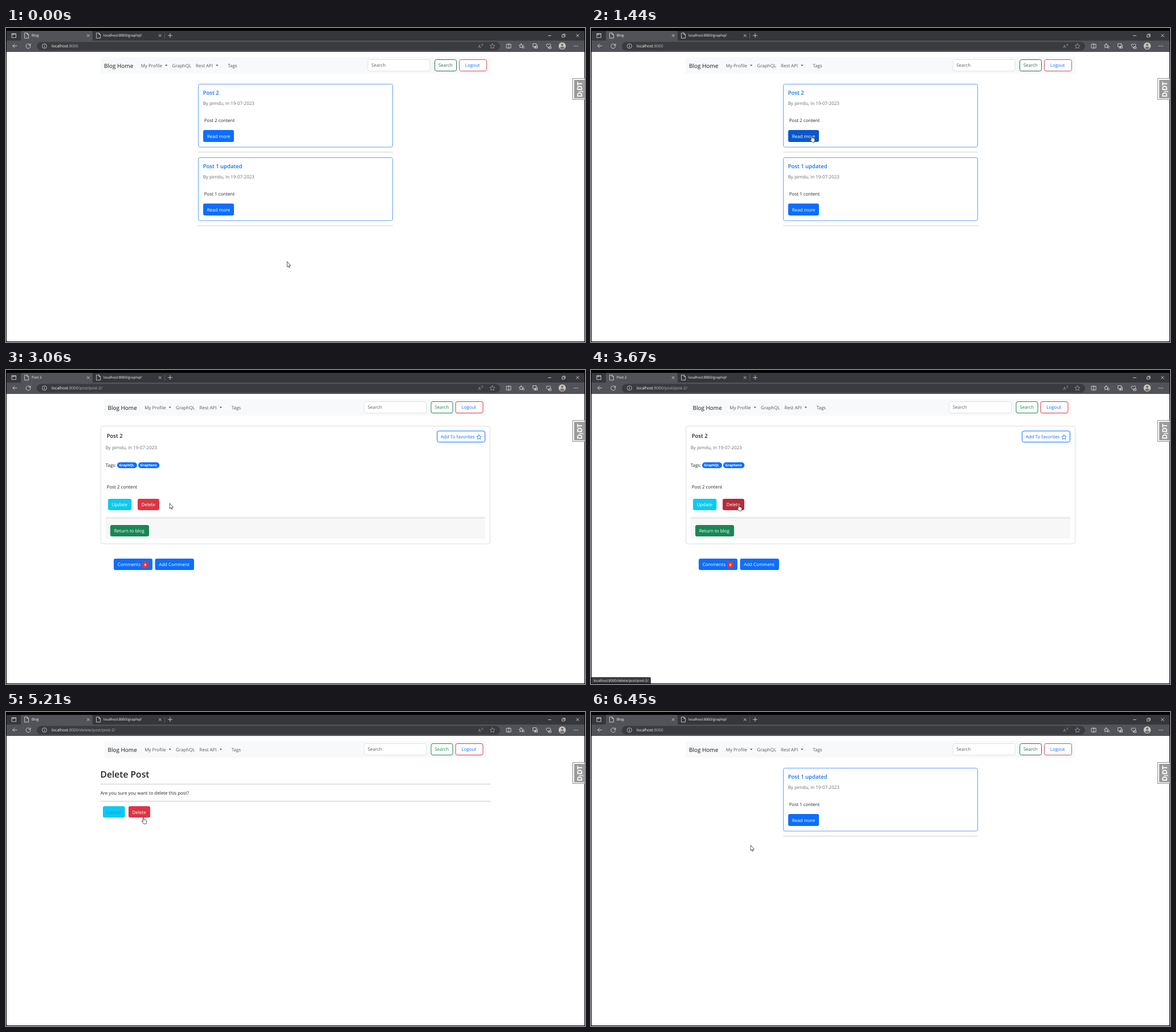
An HTML page for the animation above (7510 ms loop, 1016 by 551 pixels).

```html
<!DOCTYPE html>
<html lang="en">
<head>
<meta charset="utf-8">
<title>Blog</title>
<style>
html, body { margin: 0; width: 100%; height: 100%; overflow: hidden; background: #000; }
svg { display: block; width: 100%; height: 100%; font-family: "Open Sans", "Noto Sans", sans-serif; text-rendering: geometricPrecision; }
</style>
</head>
<body>
<svg id="stage" viewBox="0 0 1016 551"></svg>
<script>
const LOOP = 7510;
const BLUE = '#0d6efd', CYAN = '#0dcaf0', RED = '#dc3545', GREEN = '#198754', INK = '#212529', MUTED = '#686c70';
const AUTHOR = 'By pimdu, In 19-07-2023';
const stage = document.getElementById('stage');

const text = (x, y, s, fill = INK, size = 7.97, weight = 400) =>
  `<text x="${x}" y="${y}" fill="${fill}" font-size="${size}" font-weight="${weight}">${s}</text>`;
const rect = (x, y, w, h, fill, r = 0, stroke = 'none') =>
  `<rect x="${x}" y="${y}" width="${w}" height="${h}" rx="${r}" fill="${fill}" stroke="${stroke}"/>`;
const line = (d, stroke = '#e6e6e8', w = .8, fill = 'none') =>
  `<path d="${d}" fill="${fill}" stroke="${stroke}" stroke-width="${w}" stroke-linecap="round" stroke-linejoin="round"/>`;
const disc = (x, y, r, fill, stroke = 'none') =>
  `<circle cx="${x}" cy="${y}" r="${r}" fill="${fill}" stroke="${stroke}" stroke-width=".8"/>`;
const button = (x, y, w, h, label, fill, ink = '#fff') =>
  rect(x, y, w, h, fill, 3) + text(x + 6.7, y + h / 2 + 3.2, label, ink);
const outline = (x, y, w, h, label, edge, ink = edge, pad = 6.7) =>
  rect(x + .5, y + .5, w - 1, h - 1, '#fff', 3, edge) + text(x + pad, y + h / 2 + 2.8, label, ink);
const rule = (x, y, w, color = '#d0d1d2') => rect(x, y, w, 1, color);
const cross = (x, y, r) => line(`M${x - r} ${y - r}l${2 * r} ${2 * r}m0 ${-2 * r}l${-2 * r} ${2 * r}`);
const star = (x, y, r, color) => {
  let d = '';
  for (let i = 0; i < 10; i++) {
    const a = i * Math.PI / 5, q = i % 2 ? r * .5 : r;
    d += (i ? 'L' : 'M') + (x + q * Math.sin(a)).toFixed(2) + ' ' + (y - q * Math.cos(a)).toFixed(2);
  }
  return line(d + 'Z', color, .8);
};
const fileIcon = x => line(`M${x} 8.8h4l2.6 2.6v6.4h-6.6zM${x + 4} 8.8v2.6h2.6`);

function toolbarIcons() {
  return line('M19 31.5H12M15 28.3L11.8 31.5 15 34.7') +
    disc(67.5, 31.7, 4, 'none', '#d8d8da') + line('M67.5 31.3v2.4M67.5 29.6v.1') +
    text(828.5, 34.5, 'A', '#a9a9ad', 7.5) + line('M834.5 28.4q1.2 1 0 2.2M836 27.5q2 1.8 0 4', '#a9a9ad', .6) +
    star(853.5, 32, 4.6, '#a9a9ad') +
    line('M878.5 28.5h7.5v6.5h-7.5zM882.2 27.5v8.5') +
    star(904, 31.5, 4, '#e6e6e8') + line('M906.5 32.5h3M906.5 34.8h3') +
    line('M925 27.5h5.5v5.5H925zM927 35.3h5.5v-5.5M928.7 31.5v4M926.8 33.5h4') +
    line('M952 35l-3.6-3.5q-1.3-2.6 1.2-3.5 1.5 0 2.4 1.4.9-1.4 2.4-1.4 2.5.9 1.2 3.5zM952.5 33h4v3h-4z') +
    disc(976, 31.5, 6.3, '#c9c6c4') + disc(976, 29.5, 2.1, '#77706e') +
    line('M972 35.3q.5-2.9 4-2.9t4 2.9q-1.5 1.6-4 1.6t-4-1.6z', 'none', 0, '#77706e') +
    [997, 1000, 1003].map(x => disc(x, 31.7, .75, '#f0f0f0')).join('');
}

function browser(title, path, loading, t) {
  const spin = -(t - 4410) * .36;
  return rect(1, 5, 1014, 18, '#36373b') +
    line('M24 22.5q2 0 2-2V8q0-3 3-3h120q3 0 3 3v12.5q0 2 2 2z', 'none', 0, '#525358') +
    rect(1, 22, 1014, 20, '#525358') +
    rect(54, 24.5, 813, 15, '#3a3b3f', 7.5) +
    line('M10.5 9.8h7v7h-7zM10.5 11h7M12.6 11v1.4') +
    (loading
      ? `<g transform="rotate(${spin.toFixed(1)} 36.3 13.2)">${line('M34 10.4q-2.1 2.6-.2 5.6', '#fff', 1)}</g>`
      : fileIcon(33)) +
    text(45, 15.4, title, '#fff', 6.1) + cross(144.3, 13.4, 2) +
    fileIcon(159) + text(171, 15.4, 'localhost:8000/graphql/', '#fff', 6.1) + cross(270.3, 13.4, 2) +
    line('M278.5 8.5v10', '#6b6c70', .7) + line('M284.5 13.2h7M288 9.7v7') +
    line('M951.5 13.5h5') + line('M976 12h4v4h-4zM977.2 10.8h4v4') + cross(1003, 13.3, 2.3) +
    (loading ? cross(39, 31.7, 2.8) : line('M42.8 30.4A4 4 0 1 0 43 32.5M43 27.8v2.8h-2.8')) +
    toolbarIcons() +
    text(80, 34.3, `<tspan fill="#fff">localhost</tspan>:8000${path}`, '#b9b9bc', 6.95);
}

function navbar(inset, green = GREEN, red = RED) {
  const l = inset, r = -inset, grey = '#54575a';
  const caret = x => line(`M${x + l} 64.6h4.4l-2.2 2.3z`, 'none', 0, grey);
  return rect(166 + l, 51, 684 - 2 * l, 29, '#f8f9fa') +
    text(172 + l, 69.8, 'Blog Home', '#181818', 9.96) +
    text(236.7 + l, 68.6, 'My Profile', grey) + caret(279) +
    text(291.6 + l, 68.6, 'GraphQL', grey) +
    text(333 + l, 68.6, 'Rest API', grey) + caret(368.2) +
    text(389.3 + l, 68.6, 'Tags', grey) +
    outline(634.5 + r, 55, 110, 21, 'Search', '#dee2e6', '#5b5e62') +
    outline(752 + r, 55, 39, 21, 'Search', green) +
    outline(795 + r, 55, 49, 21, 'Logout', red, BLUE, 10.8);
}

function postCard(y, title, body, hover) {
  return rect(337.5, y + .5, 341, 110.5, '#fff', 3, '#5f9efe') +
    text(345.7, y + 19.2, title, BLUE, 9.5, 600) +
    text(345.7, y + 37.2, AUTHOR, MUTED) +
    text(347.8, y + 67.2, body) +
    button(346, y + 81, 54, 21, 'Read more', hover ? '#0b57cb' : BLUE) +
    rule(337, y + 119.3, 342);
}

const home = (both, hover) => navbar(0, '#2d6b57', '#cf5157') +
  (both ? postCard(98, 'Post 2', 'Post 2 content', hover) : '') +
  postCard(both ? 227 : 98, 'Post 1 updated', 'Post 1 content');

function badge(x, w, label) {
  return rect(x, 162, w, 10.3, BLUE, 5.1) + text(x + 3.6, 169.3, label, '#fff', 5.97, 700);
}

const detail = hover => navbar(6.5) +
  rect(166.5, 98.5, 683, 206.5, '#fff', 3, '#dcdddd') +
  text(176.7, 119.2, 'Post 2', INK, 9.5, 600) +
  outline(756, 106.5, 85, 20.5, 'Add To favorites', BLUE) + star(830, 118, 4.3, BLUE) +
  text(174.7, 139.4, AUTHOR, MUTED) +
  text(174.7, 169.8, 'Tags:') + badge(195, 35, 'GraphQL') + badge(232, 37.3, 'Graphene') +
  text(176.7, 208.2, 'Post 2 content') +
  button(179, 226, 41.3, 20, 'Update', CYAN) +
  button(231, 226, 38, 20, 'Delete', hover ? '#b72c3a' : RED) +
  rect(175, 259, 666, 37, '#f7f7f7') + rule(175, 258.8, 666, '#cfcfcf') +
  button(183, 272, 68, 20, 'Return to blog', GREEN) +
  button(189, 331, 68, 20, 'Comments', BLUE) +
  rect(239, 336, 11, 11, RED, 2) + text(242.7, 343.7, '0', '#fff', 5.97, 700) +
  button(261.5, 331, 68.5, 20, 'Add Comment', BLUE);

const confirmPage = hover => navbar(6.5) +
  text(165.6, 114.8, 'Delete Post', INK, 15.6, 600) +
  rule(166, 126, 684.5, '#c8c9ca') +
  text(165.7, 144.8, 'Are you sure you want to delete this post?') +
  rule(166, 156, 684.5, '#c8c9ca') +
  button(170, 165.3, 38.7, 20, 'Cancel', CYAN, '#0d97f6') +
  button(215, 165.3, 38, 20, 'Delete', hover ? '#b72c3a' : RED);

const debugHandle = rect(994.5, 88.5, 21, 37, '#fff', 0, '#8d8d8d') + rect(997, 91, 18, 32.5, '#9b9b9b') +
  `<g transform="translate(1011 121.5) rotate(-90)">${text(0, 0, 'D<tspan font-size="8">J</tspan>DT', '#fff', 12.2, 700)}</g>`;

function bubble(path, width, alpha) {
  return `<g opacity="${alpha}">` + line(`M1 550v-11h${width - 2}q2 0 2 2v9z`, 'none', 0, '#3a3b3f') +
    text(4.5, 547, 'localhost:8000' + path, '#e8e8e8', 5.97) + '</g>';
}

// Pointer moves: start, end, steps, then points as [fraction, x, y]
const moves = [
  [830, 1440, 10, [[0, 493, 410], [.3, 468, 352], [.7, 408, 226], [1, 387, 189]]],
  [2660, 3410, 12, [[0, 387, 189], [.583, 287, 234], [.75, 267, 239], [1, 259, 236]]],
  [4950, 5350, 7, [[0, 259, 236], [.714, 241, 185], [1, 238, 178]]],
  [5890, 6450, 9, [[0, 238, 178], [.6, 267, 218], [.89, 279.6, 233.5], [1, 279.8, 234]]]
];

function pointerAt(t) {
  let move = moves[0];
  for (const m of moves) if (t >= m[0]) move = m;
  const [from, to, steps, pts] = move;
  const step = Math.floor((t - from) / (to - from) * (steps - 1) + .2) + 1;
  const p = t < from ? 0 : Math.min(step / steps, 1);
  const i = Math.max(1, pts.findIndex(q => q[0] >= p));
  const [a, b] = [pts[i - 1], pts[i]], k = (p - a[0]) / (b[0] - a[0]);
  return [a[1] + (b[1] - a[1]) * k, a[2] + (b[2] - a[2]) * k];
}

const ARROW = 'M.3.3V9.3L2.3 7.5 3.7 10.5 5 9.9 3.7 7H6.3Z';
const HAND = 'M-.9.9Q-.9 0 0 0T.9.9V4.2Q1 3.6 1.8 3.7T2.6 4.6Q2.9 4 3.6 4.2T4.2 5.2Q4.6 4.7 5.2 5T5.7 6V8Q5.7 9.5 4.8 11.2H.4Q-.6 9.6-1.5 8.2L-2.8 6.6Q-2.9 5.6-2 5.9L-.9 7Z';

function draw(t) {
  const within = (a, b) => t >= a && t < b;
  const loading = within(1660, 1870) || within(3940, 4550) || within(5680, 6310);
  let page, title = 'Blog', path = '';
  if (t < 1800) page = home(true, t >= 1370);
  else if (t < 4480) {
    page = detail(t >= 3340);
    title = 'Post 2';
    path = '/post/post-2/';
  } else if (t < 6240) {
    page = confirmPage(within(5280, 5950));
    path = '/delete/post/post-2/';
  } else page = home(false);

  const settling = within(4480, 4550) || within(6240, 6310);
  const hand = within(1370, 2660) || within(3340, 4950) || within(5200, 5950);
  const [x, y] = pointerAt(t);
  return rect(1, 42, 1014, 508, '#fff') + page + (settling ? '' : debugHandle) +
    browser(title, path, loading, t) +
    (within(1660, 1800) ? bubble('/post/post-2/', 85, 1) : '') +
    (within(3610, 3940) ? bubble('/delete/post/post-2/', 104, t < 3670 ? .5 : 1) : '') +
    `<g transform="translate(${x.toFixed(2)} ${y.toFixed(2)})">${line(hand ? HAND : ARROW, '#111', .7, '#fff')}</g>`;
}

let shown = '';
function tick() {
  const next = draw(performance.now() % LOOP);
  if (next !== shown) stage.innerHTML = shown = next;
  requestAnimationFrame(tick);
}
tick();
</script>
</body>
</html>
```
